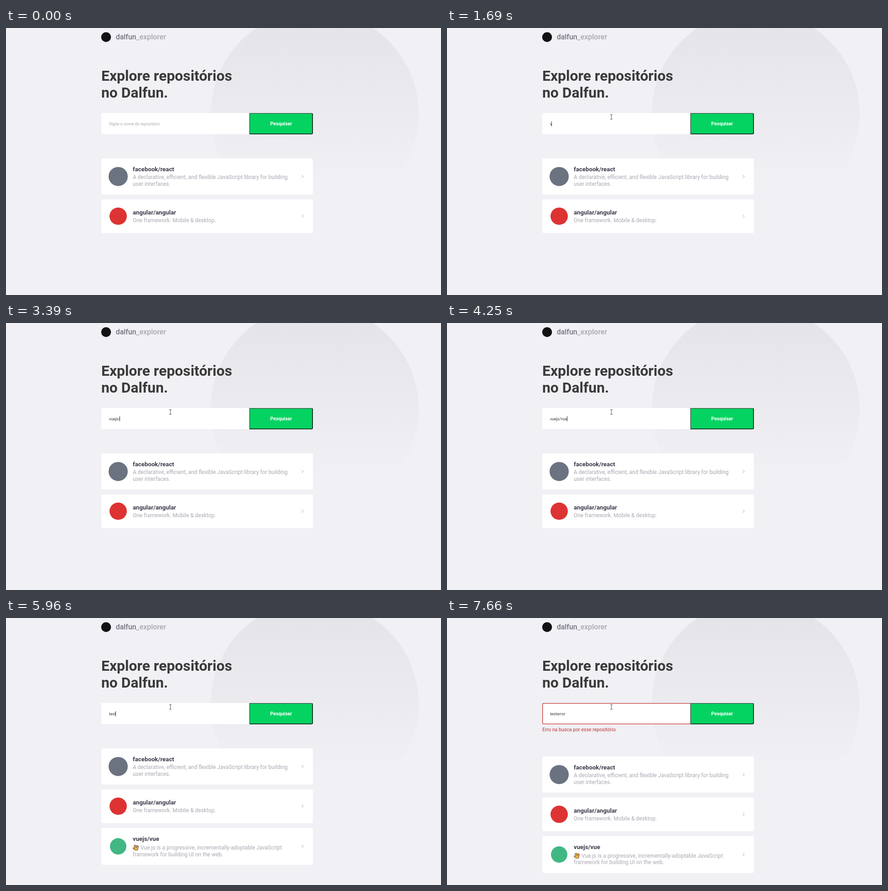
An HTML page with a canvas that plays this animation: 954x587 px, repeating every 8000 ms.

```html
<!DOCTYPE html>
<html lang="pt-BR">
<head>
<meta charset="utf-8">
<title>Explore repositórios</title>
<style>
  html, body { margin: 0; width: 100%; height: 100%; overflow: hidden; background: #f0f0f5; }
  canvas { display: block; }
</style>
</head>
<body>
<canvas id="stage" width="954" height="587"></canvas>
<script>
const ctx = document.getElementById('stage').getContext('2d');
const LOOP = 8000;
const ZOOM = 0.663; // page zoom: font sizes below are in unzoomed pixels
const LEFT = 209, RIGHT = 673, SPLIT = 533.8;
const FORM_TOP = 187, FORM_HEIGHT = 46.5;
const MUTED = '#a8a8b3', DARK = '#3d3d4d', ERROR = '#c53030';

const steps = [
  { at: 0 },
  { at: 850, caret: true, pointer: [343.5, 204.5] },
  { at: 1690, typed: 'v', caret: true },
  { at: 2550, typed: 'vue', caret: true },
  { at: 3390, typed: 'vuejs/', caret: true },
  { at: 4250, typed: 'vuejs/vue', caret: true },
  { at: 5100, cards: 3 },
  { at: 5960, typed: 'test', caret: true, cards: 3 },
  { at: 6820, typed: 'testerror', caret: true, cards: 3 },
  { at: 7660, typed: 'testerror', error: true, cards: 3 }
];

const cards = [
  {
    top: 286.8, height: 79.2, color: '#6b7280', radius: 21, title: 'facebook/react', titleY: 315,
    lines: [
      ['A declarative, efficient, and flexible JavaScript library for building', 278, 332],
      ['user interfaces.', 278, 347]
    ]
  },
  {
    top: 376.7, height: 74.2, color: '#dd3333', radius: 19, title: 'angular/angular', titleY: 410,
    lines: [['One framework. Mobile & desktop.', 278, 427]]
  },
  {
    top: 461.6, height: 81, color: '#41b883', radius: 18, title: 'vuejs/vue', titleY: 490, hand: true,
    lines: [
      ['Vue.js is a progressive, incrementally-adoptable JavaScript', 295, 509],
      ['framework for building UI on the web.', 278, 523.5]
    ]
  }
];

function text(str, x, y, size, color, weight = 400, align = 'left') {
  ctx.font = `${weight} ${size * ZOOM}px Roboto, sans-serif`;
  ctx.fillStyle = color;
  ctx.textAlign = align;
  ctx.fillText(str, x, y);
}

function disc(x, y, radius, fill) {
  ctx.fillStyle = fill;
  ctx.beginPath();
  ctx.arc(x, y, radius, 0, Math.PI * 2);
  ctx.fill();
}

function box(x, y, w, h, radii, fill) {
  ctx.fillStyle = fill;
  ctx.beginPath();
  ctx.roundRect(x, y, w, h, radii);
  ctx.fill();
}

function polyline(points, color, width) {
  ctx.strokeStyle = color;
  ctx.lineWidth = width;
  ctx.beginPath();
  points.forEach(([x, y]) => ctx.lineTo(x, y));
  ctx.stroke();
}

function drawBackground() {
  ctx.fillStyle = '#f0f0f5';
  ctx.fillRect(0, 0, 954, 587);
  const fade = ctx.createLinearGradient(0, 0, 0, 342);
  fade.addColorStop(0, '#e5e4e9');
  fade.addColorStop(1, '#f0f0f5');
  disc(677, 189, 228, fade);
}

function drawHeader() {
  disc(219.5, 20, 10.7, '#121214');
  text('dalfun', 240.7, 25.3, 24, '#737380', 500);
  text('_explorer', 285.6, 25.3, 24, MUTED, 500);
  text('Explore repositórios', LEFT, 116, 48, '#3a3a3a', 700);
  text('no Dalfun.', LEFT, 153, 48, '#3a3a3a', 700);
}

function drawButton() {
  const width = RIGHT - SPLIT, bottom = FORM_TOP + FORM_HEIGHT;
  const corners = [0, 3.3, 3.3, 0];
  box(SPLIT, FORM_TOP, width, FORM_HEIGHT, corners, '#04d361');
  ctx.save();
  ctx.beginPath();
  ctx.roundRect(SPLIT, FORM_TOP, width, FORM_HEIGHT, corners);
  ctx.clip();
  // Outset border: grey on the lit sides, black on the shaded ones
  ctx.lineWidth = 2.6;
  ctx.strokeStyle = '#4c4c4c';
  ctx.stroke();
  ctx.beginPath();
  ctx.moveTo(SPLIT, bottom);
  ctx.lineTo(SPLIT + 2, bottom - 2);
  ctx.lineTo(RIGHT - 2, FORM_TOP + 2);
  ctx.lineTo(RIGHT, FORM_TOP);
  ctx.lineTo(RIGHT, bottom);
  ctx.clip();
  ctx.strokeStyle = '#000';
  ctx.beginPath();
  ctx.roundRect(SPLIT, FORM_TOP, width, FORM_HEIGHT, corners);
  ctx.stroke();
  ctx.restore();
  text('Pesquisar', 603.3, 214, 16, '#fff', 700, 'center');
}

function drawForm({ typed = '', caret, error }) {
  const corners = [3.3, 0, 0, 3.3];
  box(LEFT, FORM_TOP, SPLIT - LEFT, FORM_HEIGHT, corners, error ? ERROR : '#fff');
  if (error) {
    box(LEFT + 1.3, FORM_TOP + 1.3, SPLIT - LEFT - 1.3, FORM_HEIGHT - 2.6, [2, 0, 0, 2], '#fff');
    text('Erro na busca por esse repositório', LEFT, 249, 16, ERROR);
  }
  text(typed || 'Digite o nome do repositório', 225.9, 213.7, 13.333, typed ? '#3a3a3a' : MUTED);
  if (caret) {
    const end = typed ? ctx.measureText(typed).width - 0.3 : 0;
    ctx.fillStyle = '#3a3a3a';
    ctx.fillRect(Math.floor(226 + end), 205, 1, 11);
  }
  drawButton();
}

function drawHand(x, y) {
  const fingers = [
    [[4, 10], [1, 7.5]], [[5, 8], [3.2, 2.5]], [[6, 8], [5.2, 1.8]],
    [[8, 8], [9.2, 2.4]], [[9, 9], [11, 4]], [[5.5, 9.5], [8.3, 9.5]]
  ];
  ctx.save();
  ctx.translate(x, y);
  ctx.lineCap = 'round';
  fingers.forEach((finger, i) => polyline(finger, '#4a3a2c', i === 5 ? 6 : 3));
  fingers.forEach((finger, i) => polyline(finger, '#f3b54a', i === 5 ? 4.4 : 1.5));
  ctx.restore();
}

function drawCard(card) {
  const middle = card.top + card.height / 2;
  box(LEFT, card.top, RIGHT - LEFT, card.height, 3.3, '#fff');
  disc(246, middle, card.radius, card.color);
  text(card.title, 278, card.titleY, 20, DARK, 700);
  card.lines.forEach(([str, x, y]) => text(str, x, y, 18, MUTED));
  if (card.hand) drawHand(278.5, 498.5);
  polyline([[648.6, middle - 3.4], [652, middle], [648.6, middle + 3.4]], '#c6c6d0', 1.2);
}

function drawPointer([x, y]) {
  const beam = (color, width) => {
    polyline([[x, y - 4.5], [x, y + 4.5]], color, width);
    [-5, 5].forEach(dy => polyline([[x - 2.5, y + dy], [x + 2.5, y + dy]], color, width));
  };
  beam('#55555a', 1);
}

function draw(time) {
  const step = steps.findLast(({ at }) => time >= at);
  drawBackground();
  drawHeader();
  drawForm(step);
  ctx.save();
  ctx.translate(0, step.error ? 17.8 : 0);
  cards.slice(0, step.cards || 2).forEach(drawCard);
  ctx.restore();
  if (time >= 850) drawPointer(step.pointer || [360.5, 195.5]);
}

const start = performance.now();
function tick() {
  draw((performance.now() - start) % LOOP);
  requestAnimationFrame(tick);
}
tick();
</script>
</body>
</html>
```
